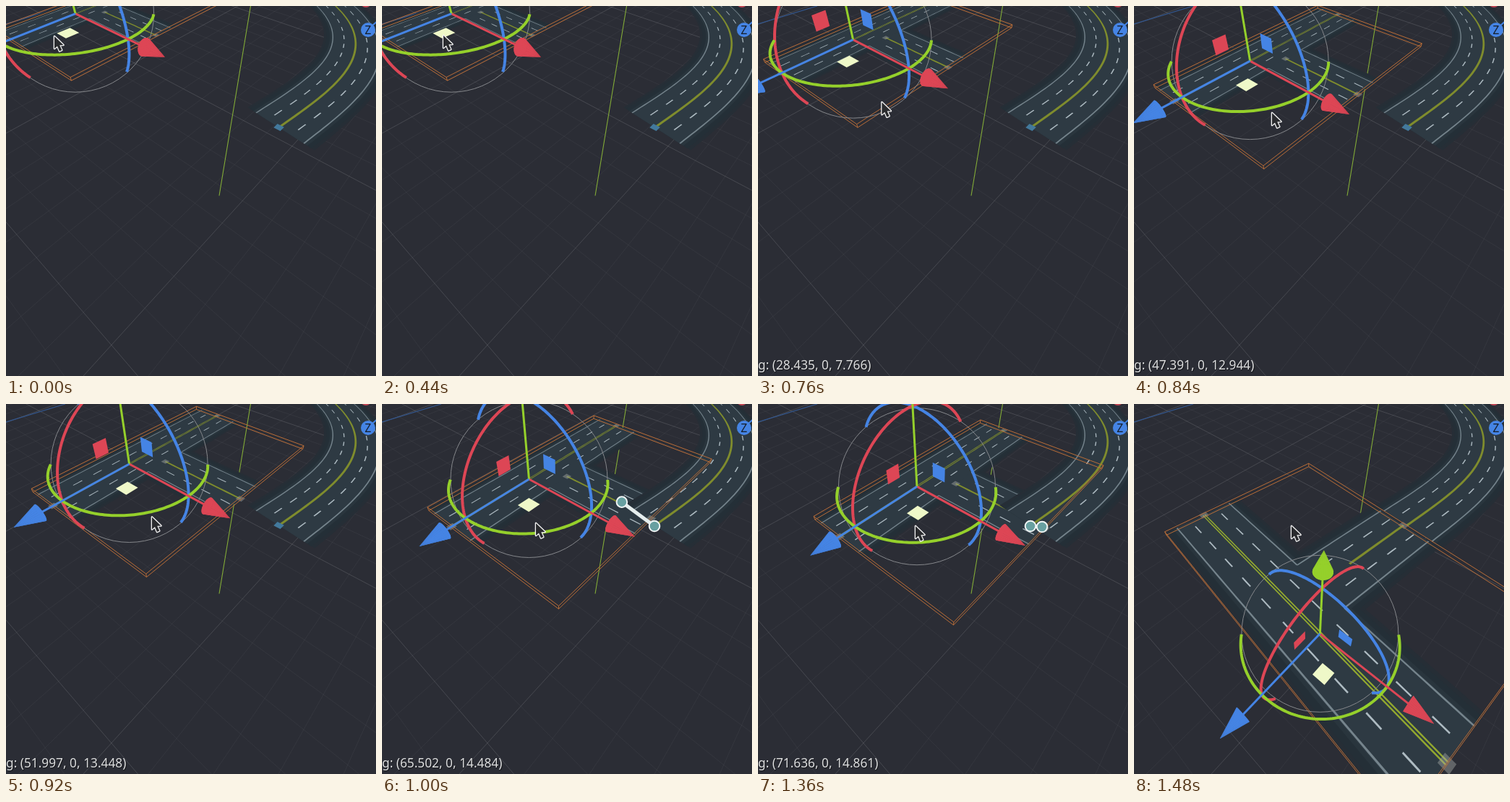
Write an HTML page with a canvas that moves like this. It is 512x512 px and loops after 2200 ms.

```html
<!DOCTYPE html>
<html lang="en">
<head>
<meta charset="utf-8">
<title>Road snapping</title>
<style>
html, body { margin: 0; width: 100%; height: 100%; overflow: hidden; background: #2b2d35; }
canvas { display: block; width: 100vw; height: 100vh; }
</style>
</head>
<body>
<canvas id="view" width="512" height="512"></canvas>
<script>
const g = document.getElementById('view').getContext('2d');
const LOOP = 2200, STEP = 40, DROP = 1480;
const RED = '#dd4655', GREEN = '#95d02b', BLUE = '#4584e4';

// Camera: vanishing points of the three axes, each with its weight per unit.
const CX = 245, UNIT = 3.876;
const AXES = [
  [-490, -273, -UNIT / 978],
  [CX, 579, -UNIT / 557],
  [822, -275, -UNIT / 866]
];

function hom(x, y, z) {
  const h = [204, 104, 1];
  [x, y, z].forEach((d, i) => {
    const [vx, vy, k] = AXES[i];
    h[0] += vx * k * d;
    h[1] += vy * k * d;
    h[2] += k * d;
  });
  return h;
}
function project(x, y, z) {
  const [a, b, w] = hom(x, y, z);
  return [a / w, b / w];
}

function trace(pts, closed) {
  g.beginPath();
  pts.forEach(p => g.lineTo(p[0], p[1]));
  if (closed) g.closePath();
}
function fill(pts, color) {
  trace(pts, true);
  g.fillStyle = color;
  g.fill();
}
function line(pts, color, width = 1, closed = false) {
  trace(pts, closed);
  g.strokeStyle = color;
  g.lineWidth = width;
  g.stroke();
}
function disc(x, y, r, color, rim) {
  g.beginPath();
  g.arc(x, y, r, 0, 7);
  if (color) { g.fillStyle = color; g.fill(); }
  if (rim) { g.strokeStyle = rim; g.stroke(); }
}

// Roads: a track is a polyline measured by length.
function track(pts) {
  let len = 0;
  const dist = pts.map((p, i) => i ? len += Math.hypot(p[0] - pts[i - 1][0], p[1] - pts[i - 1][1]) : 0);
  return {
    len,
    at(s, off) {
      let i = 1;
      while (i < pts.length - 1 && dist[i] < s) i++;
      const [ax, az] = pts[i - 1], [bx, bz] = pts[i];
      const d = dist[i] - dist[i - 1], u = (s - dist[i - 1]) / d;
      const tx = (bx - ax) / d, tz = (bz - az) / d;
      return [ax + (bx - ax) * u - tz * off, az + (bz - az) * u + tx * off];
    }
  };
}
function bezier(a, b, c, d, end) {
  return Array.from({ length: 61 }, (_, i) => {
    const t = i / 60 * end, u = 1 - t;
    return [0, 1].map(k => u * u * u * a[k] + 3 * u * u * t * b[k] + 3 * u * t * t * c[k] + t * t * t * d[k]);
  });
}
const STEM_Z = -10.2, END_X = 43.4;
const main = track([[0, -54.4], [0, 33]]);
const stem = track([[0, STEM_Z], [END_X, STEM_Z]]);
const bend = track(bezier([45.8, -8.1], [50, -38], [56, -74], [21.6, -104], 1.16));
const FIXED = { x: 0, z: 0, c: 1, s: 0 };

function place(f, lx, lz, y = 0) {
  return project(f.x + lx * f.c + lz * f.s, y, f.z - lx * f.s + lz * f.c);
}
function ribbon(f, road, off, half, color, from = 0, to = road.len) {
  const n = Math.max(1, Math.ceil((to - from) / 2)), left = [], right = [];
  for (let i = 0; i <= n; i++) {
    const s = from + (to - from) * i / n;
    left.push(place(f, ...road.at(s, off - half)));
    right.unshift(place(f, ...road.at(s, off + half)));
  }
  fill(left.concat(right), color);
}
function dashes(f, road, start, period) {
  for (let s = start; s + 3.8 < road.len; s += period)
    for (const off of [-4.5, 4.5]) ribbon(f, road, off, 0.19, '#aebbc2', s, s + 3.8);
}
function asphalt(f, roads) {
  [[12.6, '#262e36'], [11.6, '#242f37'], [10.2, '#29353d'], [9.4, '#2e3a43']].forEach(([half, color]) =>
    roads.forEach(r => ribbon(f, r, 0, half, color, r === stem ? 9 : 0)));
}
const EDGE = '#75848c', OLIVE = '#7f8c2d';

function drawBend() {
  asphalt(FIXED, [bend]);
  for (const off of [-9, 9]) ribbon(FIXED, bend, off, 0.2, EDGE);
  dashes(FIXED, bend, 3.5, 8.2);
  ribbon(FIXED, bend, 0, 0.38, OLIVE);
}
function drawJunction(f, dropped) {
  const mid = STEM_Z + 54.4;
  asphalt(f, [main, stem]);
  ribbon(f, main, 9, 0.2, EDGE);
  ribbon(f, main, -9, 0.2, EDGE, 0, mid - 9);
  ribbon(f, main, -9, 0.2, EDGE, mid + 9);
  for (const off of [-9, 9]) ribbon(f, stem, off, 0.2, EDGE, 9);
  dashes(f, main, 3, 8.7);
  dashes(f, stem, 14, 8.2);
  for (const off of [-0.33, 0.33]) ribbon(f, main, off, 0.17, dropped ? '#92a82f' : OLIVE);
  ribbon(f, stem, 0, 0.36, OLIVE, dropped ? 20 : 9);
}
function node(f, x, z, color) {
  const r = 1.15;
  fill([[-r, -r], [r, -r], [r, r], [-r, r]].map(([a, b]) => place(f, x + a, z + b)), color);
}
function drawBox(f) {
  const c = [[-12.6, -54.4], [END_X, -54.4], [END_X, 33], [-12.6, 33]], h = 0.7, color = '#b96d38';
  for (const y of [-h, h]) line(c.map(p => place(f, ...p, y)), color, 1, true);
  c.forEach(p => line([place(f, ...p, -h), place(f, ...p, h)], color));
}

function drawGrid() {
  const [kx, kz] = [-AXES[0][2], -AXES[2][2]], cell = 66.7 / 8;
  for (let n = -32; n < 40; n++) {
    const color = n % 8 ? 'rgba(255,255,255,.045)' : 'rgba(255,255,255,.13)';
    const x = -14 + n * cell, z = -3.6 + n * cell;
    line([1.44, 0.38].map(w => project(x, 0, (1 - kx * x - w) / kz)), color);
    line([1.44, 0.38].map(w => project((1 - kz * z - w) / kx, 0, z)), color);
  }
}

// Gizmo: constant size on screen, aligned to the world axes.
function drawGizmo(f) {
  const center = hom(f.x, 0, f.z), R = 108 * center[2] / UNIT;
  const axis = (i, d) => [0, 1, 2].map(k => k === i ? d * R : 0);
  const add = (...v) => [0, 1, 2].map(k => v.reduce((s, p) => s + p[k], 0));
  const at = v => project(f.x + v[0], v[1], f.z + v[2]);
  const depth = v => v.reduce((s, d, i) => s + d * AXES[i][2], 0);
  const colors = [RED, GREEN, BLUE];
  const around = (i, r, a) => add(axis((i + 1) % 3, r * Math.cos(a)), axis((i + 2) % 3, r * Math.sin(a)));

  g.lineWidth = 1;
  disc(center[0] / center[2], center[1] / center[2], 108.5, null, '#85878b');

  // Only the half of each ring nearer to the viewer shows.
  for (const i of [2, 0, 1]) {
    g.beginPath();
    let pen = false;
    for (let k = 0; k <= 240; k++) {
      const v = around(i, 1, k * Math.PI / 120), front = depth(v) <= 0;
      if (front) g[pen ? 'lineTo' : 'moveTo'](...at(v));
      pen = front;
    }
    g.strokeStyle = colors[i];
    g.lineWidth = 4;
    g.stroke();
  }
  for (const i of [0, 1, 2]) {
    line([at([0, 0, 0]), at(axis(i, 1.28))], colors[i], 3);
    const tip = at(axis(i, 1.58)), base = [];
    for (let k = 0; k < 24; k++) base.push(at(add(axis(i, 1.273), around(i, 0.102, k * Math.PI / 12))));
    fill(base, colors[i]);
    base.forEach((p, k) => fill([tip, p, base[(k + 1) % 24]], colors[i]));
  }
  [RED, '#eff8c8', BLUE].forEach((color, i) => {
    const lo = 0.273, hi = 0.455;
    fill([[lo, lo], [hi, lo], [hi, hi], [lo, hi]].map(([a, b]) =>
      at(add(axis((i + 1) % 3, a), axis((i + 2) % 3, b)))), color);
  });
}

function drawSnap(f) {
  const [x, y] = place(f, END_X, STEM_Z);
  line([[x, y], [377, 169]], '#e6eeee', 5);
  g.lineWidth = 2;
  for (const p of [[377, 169], [x, y]]) disc(p[0], p[1], 7.3, '#68a0a1', '#f0f5f5');
}
function drawCorner() {
  disc(498, -6, 8, '#c44654');
  line([[507, 27], [516, 19]], BLUE, 2);
  disc(501, 33, 10, BLUE);
  g.fillStyle = '#16202e';
  g.font = '500 15.5px "Noto Sans", sans-serif';
  g.textAlign = 'center';
  g.fillText('Z', 501, 38.5);
  g.textAlign = 'left';
}
function drawLabel([dx, dz]) {
  const num = v => String(+v.toFixed(3));
  const text = `g: (${num(dx)}, 0, ${num(dz)})`;
  g.font = '17.3px "Noto Sans", sans-serif';
  g.fillStyle = 'rgba(0,0,0,.5)';
  g.fillText(text, 1, 503.5);
  g.fillStyle = '#dcddde';
  g.fillText(text, 0, 502.5);
}
function drawCursor([x, y]) {
  const shape = [[0, 0], [0, 17], [4, 13.5], [7, 20.5], [10.3, 19], [7.2, 12.3], [12.5, 12]];
  const pts = shape.map(p => [p[0] + x, p[1] + y]);
  g.lineJoin = 'round';
  line(pts, '#f2f2f2', 2.6, true);
  fill(pts, '#2a2b2e');
  g.lineJoin = 'miter';
}

// Keys: time, then the two values to blend.
const DRAG = [
  [640, 0, 0], [840, 47.391, 12.944], [960, 54.3, 13.7], [1000, 65.502, 14.484],
  [1120, 70.2, 14.78], [1200, 70.8, 14.82], [1320, 70.8, 14.82], [1360, 71.636, 14.861]
];
const MOUSE = [
  [0, 67, 42], [200, 84, 41], [400, 84, 41], [440, 85, 41], [640, 142, 111],
  [840, 191, 148], [1000, 213, 165], [1200, 218, 169]
];
function blend(keys, t) {
  if (t <= keys[0][0]) return keys[0].slice(1);
  for (let i = 1; i < keys.length; i++) {
    const a = keys[i - 1], b = keys[i];
    if (t <= b[0]) {
      const u = (t - a[0]) / (b[0] - a[0]);
      return [1, 2].map(k => a[k] + (b[k] - a[k]) * u);
    }
  }
  return keys[keys.length - 1].slice(1);
}
function dragged(t) {
  const [dx, dz] = blend(DRAG, t);
  return { x: -66.6 + dx * 1.015, z: -14.4 + dz, c: 1, s: 0 };
}

function draw(t) {
  const dropped = t >= DROP;
  const f = dropped ? { x: 49.5, z: 36.9, c: 0.13, s: 0.9915 } : dragged(t);
  g.fillStyle = '#2b2d35';
  g.fillRect(0, 0, 512, 512);
  drawGrid();
  line([[0, 25], [82, 0]], '#33578f', 1.2);
  line([[295, 262.5], [338.5, 0]], '#84ad38', 1.1);

  drawJunction(f, dropped);
  drawBend();
  const dot = 'rgba(165,168,165,.45)';
  [[0, -54.4], [0, 33], [END_X, STEM_Z]].forEach(p => node(f, p[0], p[1], dot));
  if (!dropped) {
    node(f, 9, STEM_Z, dot);
    node(FIXED, 45.8, -8.1, '#43799c');
  }
  drawBox(f);
  drawGizmo(f);
  if (t >= 1000 && !dropped) drawSnap(dragged(Math.min(t - STEP, 1320)));
  drawCorner();
  if (t >= 480 && !dropped) drawLabel(blend(DRAG, t));
  drawCursor(blend(MOUSE, t));
}

function tick() {
  const t = performance.now() % LOOP;
  draw(Math.floor(t / STEP) * STEP);
  requestAnimationFrame(tick);
}
tick();
</script>
</body>
</html>
```
